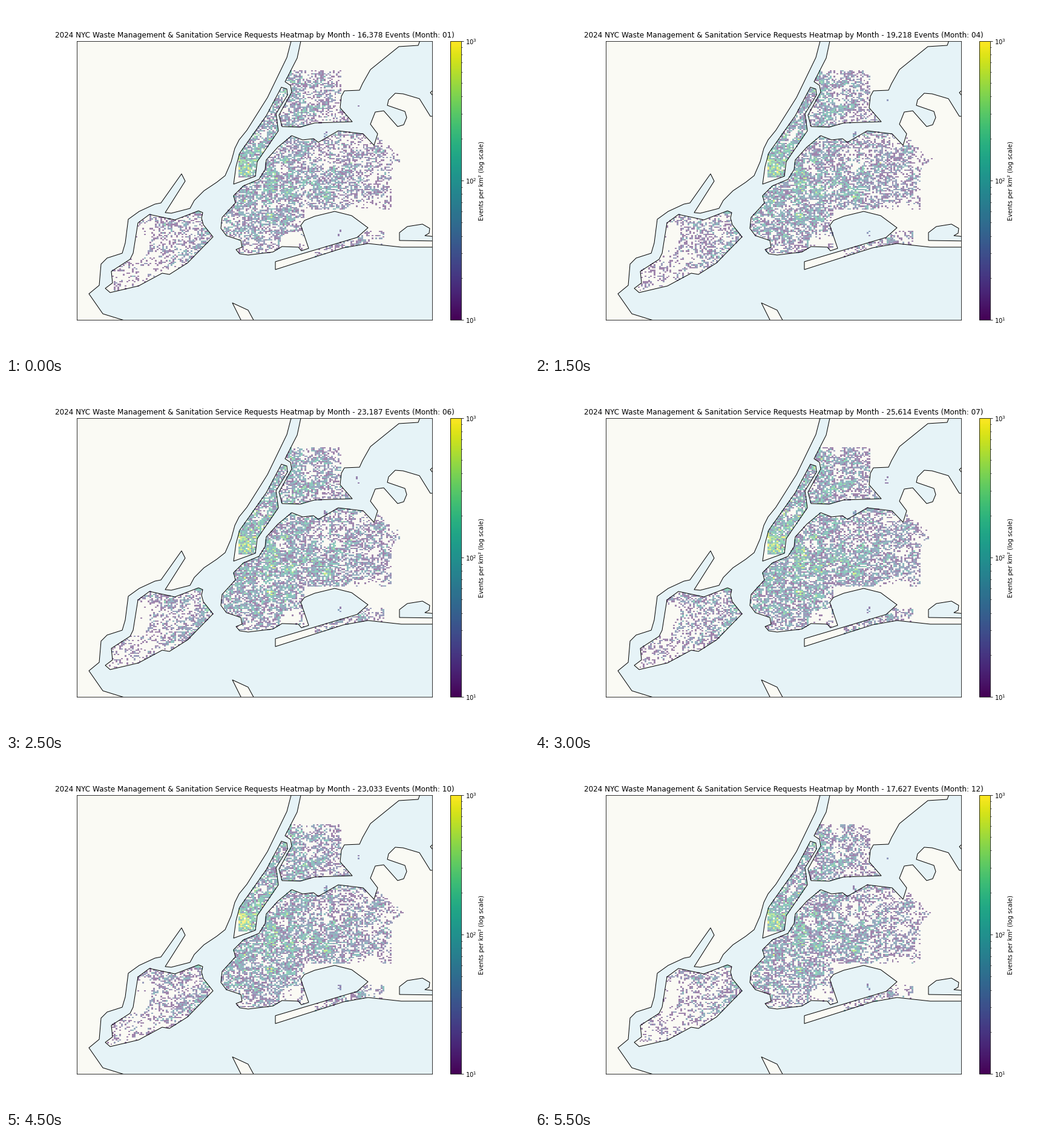
A matplotlib script for the animation above (6000 ms loop, 864x576 px).

```python
import numpy as np
import matplotlib.pyplot as plt
from matplotlib.animation import FuncAnimation
from matplotlib.collections import PolyCollection
from matplotlib.colors import LogNorm
from matplotlib.path import Path

W, H = 864, 576
MAP_BOX = [0.1, 0.1, 0.75, 0.8]
BAR_BOX = [0.85, 0.1, 0.02, 0.8]
TOP, BOTTOM = 0.1 * H, 0.9 * H
MAP_WIDTH = (BOTTOM - TOP) * 0.65 / 0.51
LEFT = 0.475 * W - MAP_WIDTH / 2
RIGHT = LEFT + MAP_WIDTH
BINS = 200
CELL_KM2 = 0.078
EVENTS = [16378, 15942, 17363, 19218, 21054, 23187,
          25614, 25962, 25157, 23033, 19486, 17627]

# Coastline corners in stage pixels; points beyond the map edge are clipped.
west_shore = [
    (475, 40), (471, 58), (464, 85), (432, 151), (398, 205), (385, 221), (378, 235),
    (372, 257), (362, 280), (348, 291), (327, 305), (311, 321), (304, 334), (273, 342),
    (263, 341), (296, 289), (290, 277), (256, 325), (246, 327), (220, 339), (202, 352),
    (197, 391), (192, 408), (167, 416), (157, 426), (154, 461), (137, 475), (160, 508),
    (215, 525), (90, 530), (90, 40)]
staten = [
    (218, 358), (237, 344), (279, 353), (318, 338), (325, 341), (323, 350), (326, 361),
    (342, 381), (300, 424), (270, 443), (258, 441), (219, 462), (172, 473), (164, 466),
    (176, 457), (174, 438), (205, 418), (210, 408)]
manhattan = [
    (376, 294), (380, 265), (386, 243), (430, 181), (455, 134), (464, 137), (465, 147),
    (446, 178), (450, 206), (415, 257), (412, 281)]
north_shore = [
    (491, 40), (487, 58), (481, 86), (461, 125), (470, 131), (472, 142), (451, 180),
    (456, 199), (486, 200), (510, 193), (572, 191), (552, 168), (554, 149), (559, 140),
    (584, 139), (589, 128), (602, 105), (649, 67), (681, 65), (690, 40)]
island_north = [
    (376, 313), (392, 297), (418, 286), (428, 270), (430, 254), (449, 233), (472, 214),
    (490, 221), (508, 219), (516, 225), (549, 206), (590, 211), (608, 230), (614, 211),
    (602, 195), (610, 175), (624, 173), (647, 199), (657, 196), (662, 184), (659, 174),
    (630, 164), (632, 155), (643, 144), (656, 145), (683, 153), (701, 182), (720, 182)]
island_south = [
    (720, 382), (692, 379), (699, 375), (700, 367), (688, 360), (663, 364), (650, 374),
    (650, 387), (720, 388), (720, 398), (653, 398), (598, 392), (558, 399), (445, 435),
    (445, 422), (580, 382), (598, 366), (571, 346), (543, 339), (510, 347), (493, 354),
    (487, 362), (500, 400), (488, 404), (483, 398), (456, 397), (441, 406), (400, 411),
    (386, 409), (380, 402), (390, 398), (388, 387), (364, 379), (355, 367), (357, 349),
    (379, 325)]
long_island = island_north + island_south
hook = [(374, 490), (400, 502), (412, 524), (391, 524)]
east_tip = [(715, 130), (701, 143), (715, 160)]
LAND = [west_shore, staten, manhattan, north_shore, long_island, hook, east_tip]

# Busy districts: x, y, radius x, radius y, extra requests per cell
DISTRICTS = [(392, 266, 8, 14, 8), (433, 280, 11, 9, 6), (465, 298, 14, 9, 2.5),
             (488, 238, 30, 14, 1.0), (545, 300, 70, 19, 1.1), (482, 150, 40, 38, 1.8)]
# Parks and airports: x, y, radius x, radius y, tilt in degrees
PARKS = [(424, 215, 5, 18, 35), (418, 328, 6, 8, 0), (399, 336, 8, 5, -20),
         (457, 268, 11, 9, 20), (492, 302, 15, 5, -15), (529, 252, 6, 20, 0),
         (500, 149, 6, 16, 0), (496, 112, 8, 11, 0), (470, 388, 20, 14, -30),
         (590, 336, 28, 12, 0), (224, 390, 14, 32, 12)]
ISLETS = [(581, 160), (551, 374), (528, 213)]

x_edges = np.linspace(LEFT, RIGHT, BINS + 1)
y_edges = np.linspace(TOP, BOTTOM, BINS + 1)
gx, gy = np.meshgrid((x_edges[:-1] + x_edges[1:]) / 2, (y_edges[:-1] + y_edges[1:]) / 2)
centres = np.column_stack([gx.ravel(), gy.ravel()])


def inside(polygon):
    return Path(polygon).contains_points(centres).reshape(gx.shape)


def radius2(x, y, rx, ry, tilt=0):
    a = np.radians(tilt)
    u = (gx - x) * np.cos(a) + (gy - y) * np.sin(a)
    v = (gy - y) * np.cos(a) - (gx - x) * np.sin(a)
    return (u / rx) ** 2 + (v / ry) ** 2


def bump(*ellipse):
    return np.exp(-radius2(*ellipse))


def street_texture():
    """Uneven blocks: slow neighbourhood drift times strong cell-to-cell spread."""
    rng = np.random.default_rng(24)
    drift = rng.normal(size=gx.shape)
    for _ in range(4):
        for axis in (0, 1):
            drift = (drift + np.roll(drift, 1, axis) + np.roll(drift, -1, axis)) / 3
    return rng.gamma(0.95, 1, gx.shape) * np.exp(0.6 * drift / drift.std())


def build_density():
    bronx = inside(north_shore) & (gy > 105) & (gx < 553 + 0.6 * np.maximum(gy - 165, 0))
    east_limit = np.where(gy > 272, 636, 658 - 1.2 * abs(gy - 252))
    beach = (gy > 372) & (gx > 510) & (gx < 626)
    mainland = (gx < east_limit) & (gy < 407) & ((gx < 492) | (gy < 336))
    core = inside(manhattan) & (gx > 384) & (gy < 284)
    city = bronx | core | inside(staten) | (inside(long_island) & (mainland | beach))

    density = 4.5 * np.exp(-np.hypot(gx - 420, gy - 290) / 100) * np.where(core, 1.9, 1)
    density += sum(gain * bump(*ellipse) for *ellipse, gain in DISTRICTS)
    density *= city
    for park in PARKS:
        density[radius2(*park) < 1] *= 0.08
    for x, y in ISLETS:
        density += 0.8 * (radius2(x, y, 4, 6) < 1)
    return density * street_texture()


def monthly_counts(month):
    autumn = 2.2 * np.exp(-((month - 9.8) / 1.3) ** 2)
    weights = density * (1 + autumn * bump(392, 267, 6, 11))
    rng = np.random.default_rng(100 + month)
    counts = rng.multinomial(EVENTS[month - 1], (weights / weights.sum()).ravel())
    return np.ma.masked_equal(counts.reshape(gx.shape) / CELL_KM2, 0)


density = build_density()
heatmaps = [monthly_counts(month) for month in range(1, 13)]
norm = LogNorm(10, 1000)

fig = plt.figure(figsize=(W / 72, H / 72), dpi=72, facecolor="white")
ax = fig.add_axes(MAP_BOX, aspect="equal", facecolor="#e6f3f7")
ax.add_collection(PolyCollection(LAND, facecolors="#fafaf4", edgecolors="none", zorder=1))
mesh = ax.pcolormesh(x_edges, y_edges, heatmaps[0], cmap="viridis", norm=norm,
                     alpha=0.5, zorder=2)
ax.add_collection(PolyCollection(LAND, facecolors="none", edgecolors="black",
                                 linewidths=1, zorder=3))
ax.set(xlim=(LEFT, RIGHT), ylim=(BOTTOM, TOP), xticks=[], yticks=[])
title = ax.set_title("", fontsize=12)

scale = plt.cm.ScalarMappable(norm=norm, cmap="viridis")
fig.colorbar(scale, cax=fig.add_axes(BAR_BOX), label="Events per km² (log scale)")


def update(index):
    mesh.set_array(heatmaps[index])
    title.set_text("2024 NYC Waste Management & Sanitation Service Requests Heatmap by Month"
                   f" - {EVENTS[index]:,} Events (Month: {index + 1:02d})")
    return mesh, title


anim = FuncAnimation(fig, update, frames=12, interval=500, repeat=True, repeat_delay=0)
plt.show()
```
